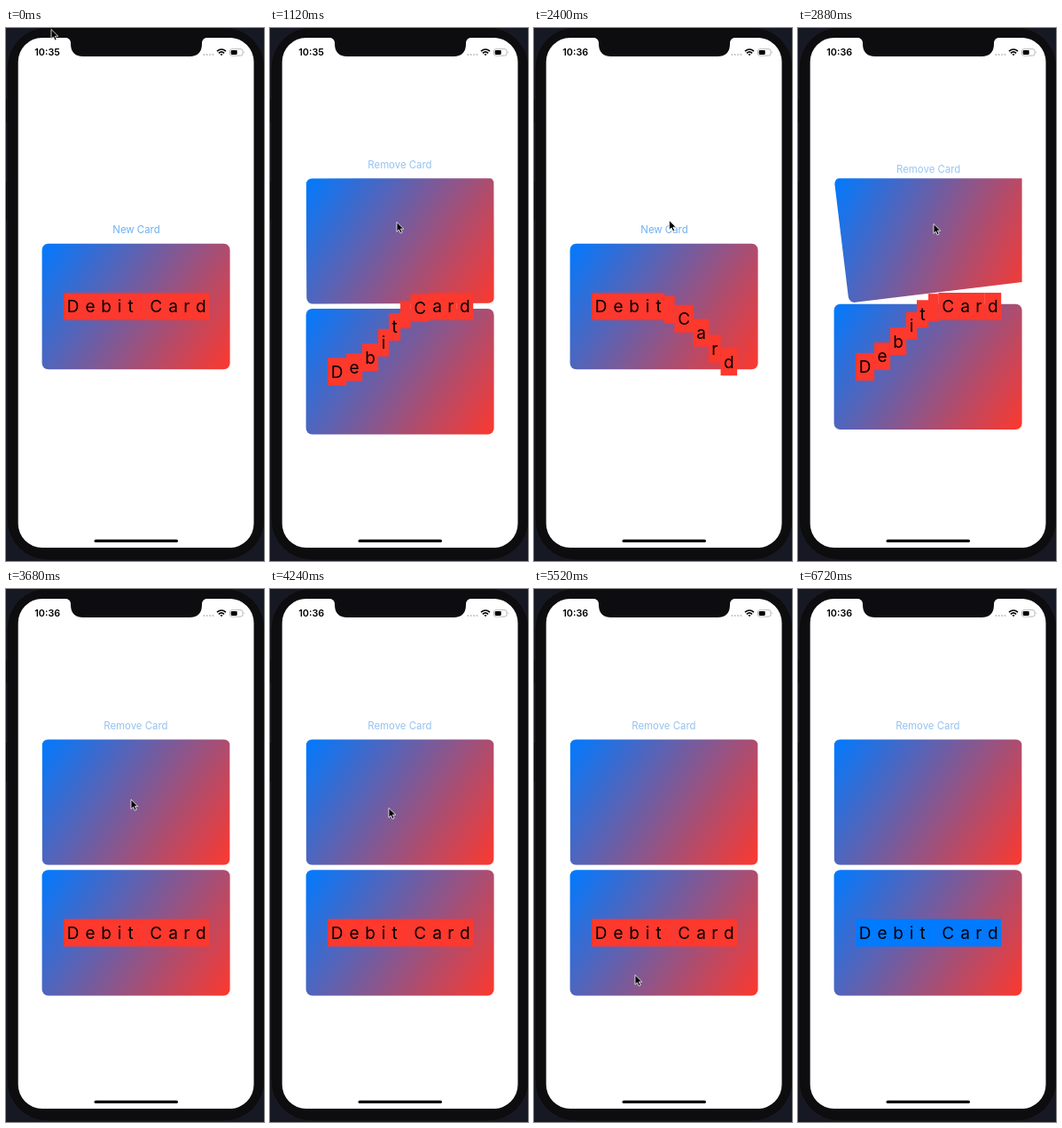
Recreate the animation shown at these times as an HTML page. Size 291x600 px, loop 6880 ms.

```html
<!DOCTYPE html>
<html lang="en">
<head>
<meta charset="utf-8">
<title>Debit card demo</title>
<style>
  html, body { margin: 0; width: 100%; height: 100%; overflow: hidden; background: #161824; }
  svg { display: block; width: 291px; height: 600px; }
  text { font-family: Inter, Roboto, sans-serif; }
  #clock { font-size: 10.8px; font-weight: 600; }
  #label { font-size: 11.4px; }
  #letters text { font-size: 19px; text-anchor: middle; }
</style>
</head>
<body>
<svg viewBox="0 0 291 600">
  <defs>
    <linearGradient id="fade" gradientUnits="userSpaceOnUse" x1="0" y1="0" x2="212" y2="141.4">
      <stop offset="0" stop-color="#007aff"/>
      <stop offset="1" stop-color="#fd382d"/>
    </linearGradient>
    <clipPath id="frame"><rect width="212" height="141.4"/></clipPath>
    <rect id="card" width="212" height="141.4" rx="7" fill="url(#fade)"/>
  </defs>

  <!-- phone -->
  <rect x="1" y="-1" width="291" height="600" rx="46" fill="#0d0d10" stroke="#1c1c21"/>
  <path d="M0 80v26M0 173v44" stroke="#08080a" stroke-width="2"/>
  <rect x="13.700" y="11" width="265.800" height="574" rx="27" fill="#fff"/>
  <path d="M66 10.500h162q-7 .5-7 7q0 14.500-14 14.500H87q-14 0-14-14.500q0-6.500-7-7z" fill="#0d0d10"/>

  <!-- status bar -->
  <text id="clock" x="32.300" y="31.200">10:35</text>
  <g fill="#b9b9bc">
    <circle cx="223.300" cy="30" r=".9"/><circle cx="226.700" cy="30" r=".9"/>
    <circle cx="230.100" cy="30" r=".9"/><circle cx="233.500" cy="30" r=".9"/>
  </g>
  <g fill="none" stroke="#000" stroke-width="1.600">
    <path d="M238 26.200q5-4.400 10 0M239.900 28.300q3.100-2.700 6.200 0"/>
    <path d="M241.300 29.300h3.400l-1.700 1.900z" fill="#000" stroke="none"/>
  </g>
  <rect x="252.500" y="23.700" width="14.500" height="7.400" rx="2.200" fill="none" stroke="#a5a5a5" stroke-width=".8"/>
  <rect x="253.700" y="24.900" width="7" height="5" rx="1.100"/>
  <path d="M268.200 26v2.800q1.200-1.400 0-2.800z" fill="#a5a5a5"/>

  <text id="label" y="231"></text>
  <g transform="translate(40.600 169.300)" clip-path="url(#frame)">
    <use id="extra" href="#card"/>
  </g>
  <use id="main" href="#card"/>
  <g id="letters"></g>

  <rect x="99.500" y="575.700" width="94.500" height="3.400" rx="1.700"/>
  <g id="cursor">
    <path d="M1 .5V11.300L3.500 9 5.200 12.900 7.200 12 5.400 8.200H8.800Z" stroke="#fff" stroke-width=".8"/>
  </g>
</svg>

<script>
const LOOP = 6880, STEP = 80, SPEED = 350, LAG = 50;
const SHOW = 784, HIDE = 1855, SHOW_AGAIN = 2598;
const GRAB = 5600, RELEASE = 5890;
const SHIFT = 73.5;
const BLUE = [0, 122, 255], RED = [253, 56, 45];
const word = 'Debit Card';
const edges = [65, 86, 104, 122, 134, 147, 158.5, 180, 197, 210.5, 229];

// time, x, y of the pointer tip
const path = [
  [0, 50, 1], [640, 147, 224], [880, 147, 224], [1120, 142, 218],
  [1680, 145, 153], [2000, 145, 153], [2480, 152, 221], [2880, 152, 220],
  [4240, 133, 246], [5200, 113, 434], [5520, 113, 434], [GRAB, 112, 392],
  [RELEASE, 132, 332], [6400, 70, -20], [LOOP, 70, -20]
];

const $ = id => document.getElementById(id);
const clamp = v => Math.min(1, Math.max(0, v));
const mix = (a, b, k) => a + (b - a) * k;

// ease-in-out, cubic-bezier(.42, 0, .58, 1)
function ease(x) {
  x = clamp(x);
  if (x === 0 || x === 1) return x;
  let lo = 0, hi = 1;
  for (let i = 0; i < 20; i++) {
    const s = (lo + hi) / 2;
    if (1.26 * s - .78 * s * s + .52 * s ** 3 < x) lo = s; else hi = s;
  }
  return lo * lo * (3 - 2 * lo);
}

const since = (t, start, span = SPEED) => ease((t - start) / span);
const openness = t => since(t, SHOW) - since(t, HIDE) + since(t, SHOW_AGAIN);
const drag = t => since(t, GRAB, RELEASE - GRAB) - since(t, RELEASE);

function pointer(t) {
  const i = path.findIndex(p => p[0] > t);
  const [a, b] = [path[i - 1], path[i]];
  const k = clamp((t - a[0]) / (b[0] - a[0]));
  const s = k * k * (3 - 2 * k);
  return [mix(a[1], b[1], s), mix(a[2], b[2], s)];
}

function add(parent, tag, attrs) {
  const el = document.createElementNS('http://www.w3.org/2000/svg', tag);
  for (const key in attrs) el.setAttribute(key, attrs[key]);
  return parent.appendChild(el);
}

const tiles = [...word].map((char, i) => {
  const left = edges[i], width = edges[i + 1] - left;
  const group = add($('letters'), 'g', {});
  const box = add(group, 'rect', { x: left, y: 298, width: width + .2, height: 31 });
  add(group, 'text', { x: left + width / 2, y: 320.3 }).textContent = char;
  return { group, box };
});

const move = (el, x, y) => el.setAttribute('transform', `translate(${x} ${y})`);

function draw(t) {
  const open = openness(t);
  const leaving = t >= HIDE && t < SHOW_AGAIN;
  const shown = t >= SHOW && !leaving;
  const label = $('label');

  $('clock').textContent = t < 1520 ? '10:35' : '10:36';
  label.textContent = shown ? 'Remove Card' : 'New Card';
  label.setAttribute('fill', shown ? '#94c2f2' : '#70b0f2');
  label.setAttribute('opacity', shown ? mix(.4, 1, open) : mix(1, .3, open));
  move(label, 120.3 - 10 * open, -SHIFT * open);

  // swings in from its top left corner, shrinks away around its centre
  $('extra').setAttribute('transform', leaving
    ? `translate(106 70.7) scale(${open}) translate(-106 -70.7)`
    : `rotate(${-90 * (1 - open)})`);
  $('extra').setAttribute('visibility', open > 0 ? 'visible' : 'hidden');
  move($('main'), 40.6, 242.8 + SHIFT * open);

  tiles.forEach(({ group, box }, i) => {
    const own = t - i * LAG, pull = drag(own), tint = since(own, RELEASE);
    move(group, 20 * pull, SHIFT * openness(own) - 60 * pull);
    box.setAttribute('fill', `rgb(${RED.map((c, n) => Math.round(mix(c, BLUE[n], tint)))})`);
  });

  move($('cursor'), ...pointer(t));
}

const began = performance.now();
function tick() {
  const t = (performance.now() - began) % LOOP;
  draw(Math.min(LOOP - 2 * STEP, Math.floor(t / STEP) * STEP));
  requestAnimationFrame(tick);
}
tick();
</script>
</body>
</html>
```
